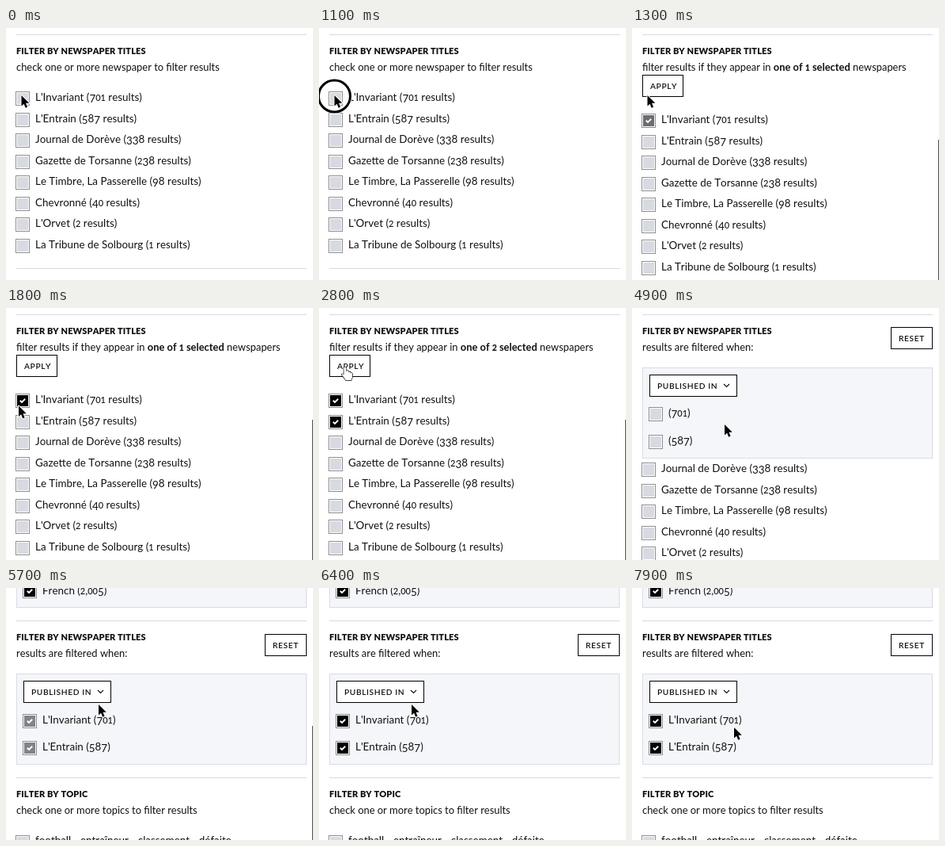
Recreate the animation shown at these times as an HTML page with a canvas. Size 388 by 318 pixels, loop 8000 ms.

```html
<!DOCTYPE html>
<html lang="en">
<head>
<meta charset="utf-8">
<title>Newspaper filter</title>
<style>
html, body { margin: 0; width: 100%; height: 100%; overflow: hidden; background: #fff; }
canvas { display: block; }
</style>
</head>
<body>
<canvas id="stage" width="388" height="318"></canvas>
<script>
const ctx = document.getElementById('stage').getContext('2d');
const LOOP = 8000, STEP = 100;
const INK = '#111', LINE = '#d9d9dc', PANEL = '#f5f6fa';
const PITCH = 26.5;

const papers = [
  ["L'Invariant", 701], ["L'Entrain", 587], ['Journal de Dorève', 338],
  ['Gazette de Torsanne', 238], ['Le Timbre, La Passerelle', 98],
  ['Chevronné', 40], ["L'Orvet", 2], ['La Tribune de Solbourg', 1]
];

// time, x, y of the pointer tip
const path = [
  [0, 19.5, 85], [1500, 19.5, 85], [1800, 16, 123.5], [2000, 20, 142], [2600, 20, 142],
  [2800, 33, 75], [2900, 34, 72], [3900, 34, 72], [4200, 117, 147],
  [7800, 117, 147], [7900, 129, 176], [8000, 129, 176]
];

// press, release, x, y
const clicks = [[100, 1100, 19.5, 86], [2000, 2100, 20, 142], [2900, 3000, 34, 72]];

const arrow = new Path2D('M0 0V13.6L3.1 10.7 5.2 15.7 7.6 14.7 5.5 9.8H9.8Z');
const hand = new Path2D('M-1.6 9V.8a1.5 1.5 0 0 1 3 0V6l.1-.6a1.4 1.4 0 0 1 2.8 0V6.6' +
  'a1.3 1.3 0 0 1 2.6 .2v1a1.2 1.2 0 0 1 2.3 .4V11c0 2-1 3-1.4 5H.6' +
  'c-.8-2.4-3-4-4.6-6.3-.8-1.3 .9-2 2.4-.7z');

function pointerAt(t) {
  const i = path.findIndex(p => p[0] > t);
  const a = path[i - 1], b = path[i], k = (t - a[0]) / (b[0] - a[0]);
  return [a[1] + (b[1] - a[1]) * k, a[2] + (b[2] - a[2]) * k];
}

// Text with old-style figures; returns the end position.
function text(str, x, y, size = 13.4, weight = 400, spacing = 0) {
  ctx.fillStyle = INK;
  ctx.fontKerning = 'none';
  ctx.letterSpacing = spacing + 'px';
  for (const part of str.match(/[012]|[34579]|[^0-579]+/g)) {
    const small = /^[012]$/.test(part), low = /^[34579]$/.test(part);
    ctx.font = `${small ? weight + 100 : weight} ${small ? size * 0.82 : size}px Lato, "Open Sans", sans-serif`;
    ctx.fillText(part, x, y + (low ? 2 : 0));
    x += ctx.measureText(part).width;
  }
  return x;
}

const heading = (str, y) => text(str, 13, y, 11, 900, 0.1);
const note = (str, y, x = 13, weight = 400) => text(str, x, y, 12.9, weight);

function rect(x, y, w, h, color) {
  ctx.fillStyle = color;
  ctx.fillRect(x, y, w, h);
}

function frame(x, y, w, h, fill, stroke) {
  rect(x, y, w, h, fill);
  ctx.strokeStyle = stroke;
  ctx.lineWidth = 1;
  ctx.strokeRect(x + 0.5, y + 0.5, w - 1, h - 1);
}

const divider = y => rect(13, y, 367, 1, LINE);
const panel = y => frame(13, y, 367, 115, PANEL, '#d8dce5');

function button(label, x, y, w) {
  frame(x, y, w, 28, '#fff', '#000');
  text(label, x + 10, y + 18, 10.2, 600, 0.6);
}

// dark: 0 is empty, 1 is fully checked
function checkbox(cx, cy, dark = 0) {
  const y = Math.round(cy);
  frame(cx - 9, y - 9, 18, 18, '#fff', '#8e8e90');
  const mix = v => Math.round(v * (1 - dark));
  rect(cx - 7, y - 7, 14, 14, `rgb(${mix(215)},${mix(218)},${mix(224)})`);
  if (!dark) return;
  ctx.strokeStyle = '#fff';
  ctx.lineWidth = 1.9;
  ctx.beginPath();
  ctx.moveTo(cx - 3.2, y - 0.2);
  ctx.lineTo(cx - 1, y + 1.9);
  ctx.lineTo(cx + 3.2, y - 2.2);
  ctx.stroke();
}

function list(first, cy, darks = []) {
  papers.slice(first).forEach(([name, n], i) => {
    const y = cy + i * PITCH;
    checkbox(21, y, darks[i]);
    text(`${name} (${n} results)`, 37, Math.round(y + 3));
  });
}

function publishedIn(y) {
  button('PUBLISHED IN', 22, y, 111);
  ctx.strokeStyle = INK;
  ctx.lineWidth = 1.2;
  ctx.beginPath();
  ctx.moveTo(116, y + 12);
  ctx.lineTo(119.5, y + 15.4);
  ctx.lineTo(123, y + 12);
  ctx.stroke();
}

const ramp = (t, from, steps) => Math.max(0, Math.min(1, (t - from + STEP) / (steps * STEP)));

function choosing(t) {
  divider(8);
  heading('FILTER BY NEWSPAPER TITLES', 33);
  if (t < 1300) {
    note('check one or more newspaper to filter results', 54);
    list(0, 89);
    divider(303);
    return;
  }
  let x = note('filter results if they appear in ', 54);
  x = note(`one of ${t < 2300 ? 1 : 2} selected`, 54, x, 700);
  note(' newspapers', 54, x);
  button('APPLY', 13, 59, 52);
  list(0, 117, [ramp(t, 1300, 2), ramp(t, 2300, 3)]);
}

function applying() {
  divider(8);
  heading('FILTER BY NEWSPAPER TITLES', 33);
  note('results are filtered when:', 54);
  button('RESET', 327, 24, 53);
  panel(75);
  publishedIn(84);
  papers.slice(0, 2).forEach(([, n], i) => {
    checkbox(30, 134 + 35 * i);
    text(`(${n})`, 46, 137 + 35 * i);
  });
  list(2, 204);
}

function applied(t) {
  const dark = 0.4 + 0.6 * ramp(t, 5800, 2);
  panel(-90);
  checkbox(30, 4, 1);
  text('French (2,005)', 46, 8);
  divider(41);
  heading('FILTER BY NEWSPAPER TITLES', 66);
  note('results are filtered when:', 87);
  button('RESET', 327, 58, 53);
  panel(108);
  publishedIn(117);
  papers.slice(0, 2).forEach(([name, n], i) => {
    checkbox(30, 168 + 34 * i, dark);
    text(`${name} (${n})`, 46, 171 + 34 * i);
  });
  divider(239);
  heading('FILTER BY TOPIC', 264);
  note('check one or more topics to filter results', 285);
  checkbox(21, 321);
  text('football - entraîneur - classement - défaite', 37, 323);
}

function scrollbar(t) {
  const bar = (y, alpha) => rect(387, y, 1, 318 - y, `rgba(60,60,60,${alpha})`);
  if (t >= 1300 && t < 3500) bar(141, 0.9);
  else if (t >= 3500 && t < 4900) bar(136, t < 4800 ? 0.9 : 0.4);
  else if (t >= 5700 && t < 6400) bar(174, t < 6300 ? 0.9 : 0.4);
}

function ring(t) {
  for (const [down, up, x, y] of clicks) {
    if (t < down || t >= up + 2 * STEP) continue;
    const leaving = t > up;
    const r = leaving ? 28.5 : t === down ? 16 : 20;
    ctx.globalAlpha = leaving ? 0.35 : t === down ? 0.6 : 1;
    ctx.beginPath();
    ctx.arc(x, y, r, 0, Math.PI * 2);
    ctx.strokeStyle = '#fff';
    ctx.lineWidth = 4.4;
    ctx.stroke();
    ctx.strokeStyle = '#000';
    ctx.lineWidth = 3;
    ctx.stroke();
    ctx.globalAlpha = 1;
  }
}

function pointer(t) {
  const isHand = (t >= 2800 && t < 3500) || t === 4000;
  const shape = isHand ? hand : arrow;
  ctx.save();
  ctx.translate(...pointerAt(t));
  ctx.lineJoin = 'round';
  ctx.lineWidth = isHand ? 1.3 : 2;
  ctx.strokeStyle = isHand ? '#000' : '#fff';
  ctx.stroke(shape);
  ctx.fillStyle = isHand ? '#fff' : '#000';
  ctx.fill(shape);
  ctx.restore();
}

function draw(now) {
  const t = Math.floor((now % LOOP) / STEP) * STEP;
  rect(0, 0, 388, 318, '#fff');
  if (t < 3500) choosing(t);
  else if (t < 5700) applying();
  else applied(t);
  scrollbar(t);
  ring(t);
  pointer(t);
}

let start;
function tick(now) {
  start ??= now;
  draw(Math.max(0, now - start));
  requestAnimationFrame(tick);
}
draw(0);
requestAnimationFrame(tick);
</script>
</body>
</html>
```
